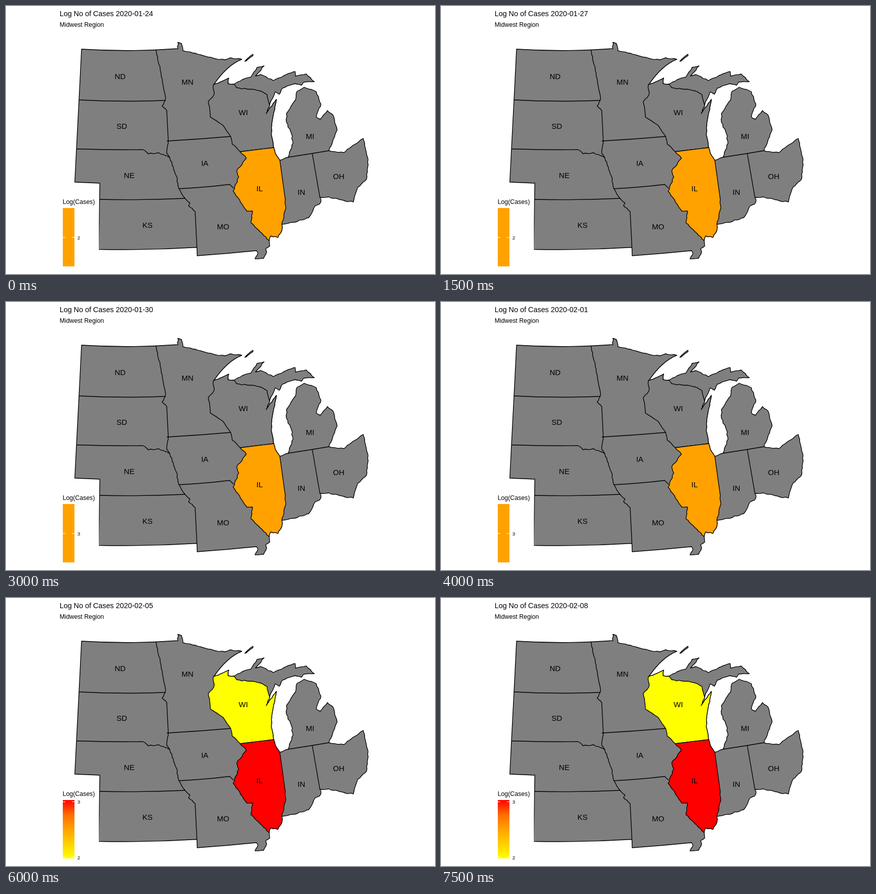
Recreate the animation shown at these times as an HTML page. Size 846x528 px, loop 8 s.

```html
<!DOCTYPE html>
<html lang="en">
<head>
<meta charset="utf-8">
<title>Log No of Cases</title>
<style>
html, body { margin: 0; width: 100%; height: 100%; overflow: hidden; background: #fff; }
svg { display: block; font: 12.3px "Liberation Sans", Arial, sans-serif; }
#map path { stroke: #000; stroke-width: 1.35; stroke-linejoin: round; fill: none; }
#names { font-size: 15px; text-anchor: middle; }
.tick { font-size: 9.8px; }
</style>
</head>
<body>
<svg width="846" height="528" viewBox="0 0 846 528">
  <defs>
    <linearGradient id="heat" x1="0" y1="1" x2="0" y2="0">
      <stop offset="0" stop-color="#ff0"/>
      <stop offset=".25" stop-color="#ffd000"/>
      <stop offset=".5" stop-color="#ffa200"/>
      <stop offset=".75" stop-color="#ff6c00"/>
      <stop offset="1" stop-color="#f00"/>
    </linearGradient>
  </defs>
  <text id="title" x="105.7" y="20" font-size="14.35"></text>
  <text x="105.7" y="41">Midwest Region</text>
  <g id="map"></g>
  <g id="names"></g>
  <rect x="106" y="376" width="77.3" height="143" fill="#fff"/>
  <text x="111.7" y="390">Log(Cases)</text>
  <rect id="bar" x="112" y="398" width="23" height="115"/>
  <g id="single">
    <path d="M112 456h5m13 0h5" stroke="#fff"/>
    <text id="level" class="tick" x="140.8" y="460"></text>
  </g>
  <g id="range">
    <path d="M112 401.5h5m13 0h5M112 510.5h5m13 0h5" stroke="#fff"/>
    <text class="tick" x="140.8" y="405">3</text>
    <text class="tick" x="140.8" y="515">2</text>
  </g>
</svg>
<script>
const $ = id => document.getElementById(id);

function add(parent, tag, attrs) {
  const el = document.createElementNS('http://www.w3.org/2000/svg', tag);
  for (const key in attrs) el.setAttribute(key, attrs[key]);
  return $(parent).appendChild(el);
}
const line = (...arcs) => add('map', 'path', { d: 'M' + arcs.join('L') });
const area = (...arcs) => line(...arcs, arcs[0].split(' ')[0] + 'Z');
const fill = (el, color) => el.style.fill = color;

let seed = 7;
const random = () => (seed = seed * 16807 % 2147483647) / 2147483647;

// Joins key points by a wavering line, as along a shore or river
function rough(keys, size = 1) {
  const points = keys.split(' ').map(p => p.split(',').map(Number));
  const out = [];
  points.forEach(([x, y], i) => {
    out.push([x, y]);
    if (i === points.length - 1) return;
    const dx = points[i + 1][0] - x, dy = points[i + 1][1] - y;
    const length = Math.hypot(dx, dy), steps = Math.round(length / 5);
    for (let k = 1; k < steps; k++) {
      const t = k / steps, shift = (random() * 2 - 1) * size / length;
      out.push([x + dx * t - dy * shift, y + dy * t + dx * shift]);
    }
  });
  return out.map(p => p.map(v => v.toFixed(1)).join()).join(' ');
}

// Coast and outer borders, clockwise
const northDakota = '149,85 Q222,89.5 295,86.5';
const minnesota = rough('339,84 339,71.5 346,74 349,88 373,93 413,104 431,106 443,102 465,105');
const superior = '465,105 Q437,116 411,153';
const wiNorth = rough('409,155 431,146 439,142 438,153 450,154');
const upperMichigan = rough('450,154 466,145 483,140 495,121 509,118 492,138 503,135 527,147 548,137 570,129 571,138 592,134 608,149 587,150 583,156 569,153 545,162 539,174 531,169 520,195');
const wiEast = rough('520,195 513,212 533,184 524,235 523,253 528,279', .6);
const ilLake = rough('528,279 531,290 540,304', .5);
const lowerMichigan = rough('540,304 556,298 566,270 563,252 553,229 553,212 571,185 574,168 588,160 612,169 621,193 612,219 620,223 634,206 645,215 653,244 637,285');
const ohio = rough('637,285 666,289 685,274 704.5,261 714,303 711,341 694,357 685,386 668,384 636,376 619,377');
const indiana = rough('619,377 621,386 607,398 597,417 570,426 545,430', 1.5);
const ilSouth = rough('544,430 544,442 536,456 522,453 519,462');
const bootheel = rough('519,462 520,473 512,478 514,485 508,497 491,498 497,487 494,482', .6);
const southWest = '494,482 Q435,488 377,492 L376.5,475.5 Q280,481.5 182.8,479.5 L185,349 135.7,347 139,281 144,185';

// Inner borders
const wiMichigan = rough('450,154 455,161 500,167 515,175 520,195');
const wiWest = rough('462,287 446,272 443,257 428,235 403,219 399,188 410,175 409,155');
const ilEast = '540,304 L' + rough('550,376 552,398 544,430');
const ilWest = rough('519,462 508,452 483,427 486,404 475,404 448,365 459,337 455,325 474,300 462,287');
const rivers = rough('295,86 306,133 313,172 314,186 308,197 317,206') + 'L' +
  rough('320,265 317,290 323,299 336,335 341,360 353,379 363,388 360,393 373,405') + 'L376.5,475';

fill(area(northDakota, minnesota, superior, wiNorth, upperMichigan, wiEast, ilLake,
  lowerMichigan, ohio, indiana, ilSouth, bootheel, southWest), '#7f7f7f');
fill(area(rough('471,109 479,101 487,95 487,98 474,108', .5)), '#7f7f7f');
const wisconsin = area(wiNorth, wiMichigan, wiEast, wiWest);
const illinois = area(ilLake, ilEast, ilSouth, ilWest);
line(rivers);
line('144,185 Q230,189.5 314,186');
line('139,281.5 Q205,284 270,283', rough('270,283 280,291 301,289 323,299'));
line('184.5,381 Q270,383 353,379');
line('317,266 Q380,262.5 443,257');
line('341,360 Q392,357.5 441,351.5 L449,359');
line('556,298 604,290.5 637,285');
line('604,290.5 619,377');

const labels = {
  ND: [225, 144], MN: [358, 155], SD: [228.5, 242], WI: [468, 215], MI: [599.5, 262], NE: [243, 339],
  IA: [392, 315], IL: [500, 365], IN: [582.5, 372], OH: [656, 341], KS: [279, 437], MO: [428, 440]
};
for (const name in labels) {
  const [x, y] = labels[name];
  add('names', 'text', { x, y }).textContent = name;
}

const show = (id, on) => $(id).style.display = on ? '' : 'none';

function draw(now) {
  const day = Math.floor(now % 8000 / 500);
  const date = new Date(Date.UTC(2020, 0, 24 + day)).toISOString().slice(0, 10);
  const spread = day >= 12;
  $('title').textContent = 'Log No of Cases ' + date;
  $('level').textContent = day < 6 ? 2 : 3;
  fill(wisconsin, spread ? '#ff0' : '#7f7f7f');
  fill(illinois, spread ? '#f00' : '#ffa200');
  fill($('bar'), spread ? 'url(#heat)' : '#ffa200');
  show('single', !spread);
  show('range', spread);
}

const start = performance.now();
function tick() {
  draw(performance.now() - start);
  requestAnimationFrame(tick);
}
tick();
</script>
</body>
</html>
```
